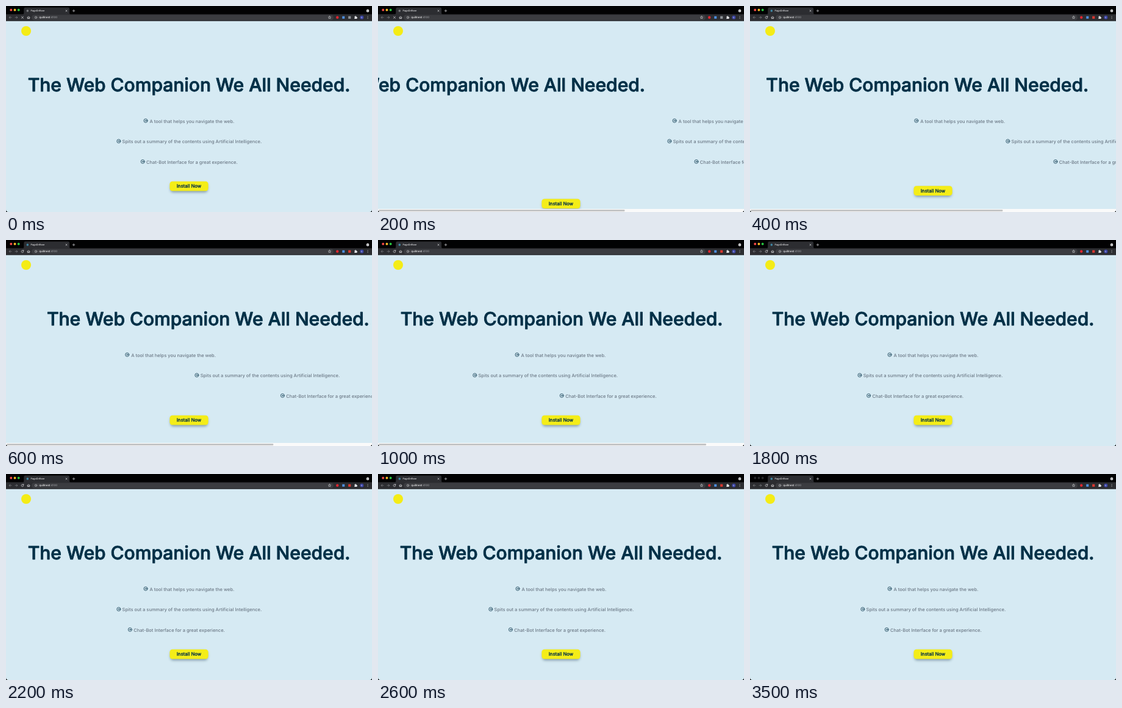
Write an HTML page that moves like this. It is 600 by 338 pixels and loops after 3.6 s.

```html
<!DOCTYPE html>
<html lang="en">
<head>
<meta charset="utf-8">
<title>PageDrifteer</title>
<style>
  html, body { margin: 0; width: 100%; height: 100%; overflow: hidden; background: #000; }
  svg { display: block; width: 600px; height: 338px; }
  text { font-family: Inter, "Open Sans", sans-serif; text-rendering: geometricPrecision; }
  .line { fill: none; stroke: #d4d5d7; stroke-width: .7; stroke-linecap: round; stroke-linejoin: round; }
  .dim { stroke: #85868a; }
  .heavy { font-weight: 500; fill: #023047; stroke: #023047; stroke-linejoin: round; text-anchor: middle; }
  .item text { font-size: 7.5px; font-weight: 500; fill: #6c7986; text-anchor: middle; }
  .item circle, .item path { fill: none; stroke: #023047; stroke-width: .75; stroke-linecap: round; stroke-linejoin: round; }
</style>
</head>
<body>
<svg viewBox="0 0 600 338" xmlns="http://www.w3.org/2000/svg">
  <defs>
    <clipPath id="win"><path d="M0 0H600V334a4 4 0 0 1-4 4H4a4 4 0 0 1-4-4Z"/></clipPath>
    <filter id="soft" x="-20%" y="-50%" width="140%" height="220%"><feGaussianBlur stdDeviation="1.9"/></filter>
  </defs>
  <rect width="600" height="338" fill="#000"/>
  <g clip-path="url(#win)">
    <rect y="24.5" width="600" height="313.5" fill="#d6eaf3"/>
    <circle cx="33" cy="41" r="8" fill="#f4ec16"/>

    <text id="title" class="heavy" x="300" y="140" font-size="30" stroke-width=".9">The Web Companion We All Needed.</text>
    <g id="items"></g>

    <g id="button">
      <rect x="269.5" y="290.5" width="61" height="15.2" rx="4.5" fill="#31505f" opacity=".5" filter="url(#soft)"/>
      <rect x="268.4" y="287.8" width="63.2" height="15.8" rx="4.5" fill="#f4ed18"/>
      <text class="heavy" x="300" y="298.3" font-size="7.7" stroke-width=".3">Install Now</text>
    </g>

    <g id="scroll">
      <rect y="333" width="600" height="5" fill="#fafafa"/>
      <rect id="thumb" x="1" y="334.3" height="2.7" rx="1.35" fill="#c0c1c2"/>
    </g>

    <!-- tab strip -->
    <rect width="600" height="14" fill="#020203"/>
    <g id="lights"><circle cx="8.3" cy="6.5" r="1.9"/><circle cx="14.5" cy="6.5" r="1.9"/><circle cx="20.7" cy="6.5" r="1.9"/></g>
    <path d="M27 14q2.3 0 2.3-2.3V5q0-2.4 2.4-2.4h70q2.4 0 2.4 2.4v6.7q0 2.3 2.3 2.3Z" fill="#2c2d31"/>
    <circle id="favicon" cx="35.3" cy="7.9" r="1.8"/>
    <text x="40.5" y="9.2" font-size="3.8" font-weight="500" fill="#e6e6e8">PageDrifteer</text>
    <path class="line" d="M97.9 6.7l2.3 2.3m0-2.3l-2.3 2.3M109.2 7.9h3.6M111 6.1v3.6"/>
    <circle cx="593" cy="7.9" r="2.3" fill="#e4e5e7"/>
    <path d="M591.9 7.5l1.1 1.1 1.1-1.1" fill="none" stroke="#111" stroke-width=".7"/>

    <!-- toolbar -->
    <rect y="13.5" width="600" height="11" fill="#2c2d31"/>
    <rect x="42" y="14.6" width="495" height="8.6" rx="4.3" fill="#3b3c40"/>
    <path class="line dim" d="M9 18.8H5.2m1.7-1.7l-1.7 1.7 1.7 1.7M15 18.8h3.8m-1.7-1.7l1.7 1.7-1.7 1.7"/>
    <path id="stop" class="line" d="M25.4 17.2l3.2 3.2m0-3.2l-3.2 3.2"/>
    <path id="reload" class="line" d="M28.8 19.3a1.9 1.9 0 1 1-.5-1.8l.5.5v-1.5m0 1.5h-1.5"/>
    <path class="line" d="M34.7 18.9l2.3-2 2.3 2m-3.9-.4v2.4h1v-1.5h1.2v1.5h1v-2.4"/>
    <circle class="line" cx="49" cy="18.8" r="1.8" style="stroke-width:.5"/>
    <path class="line" d="M49 18.7v.9M49 17.8v.01" style="stroke-width:.5"/>
    <text x="54.2" y="20.4" font-size="4.5" font-weight="500" fill="#f0f0f1">quillnest<tspan fill="#96989c">:4100</tspan></text>
    <path id="star" class="line" style="stroke-width:.6"/>
    <circle cx="543.2" cy="18.8" r="2.2" fill="#e0262f"/>
    <rect x="551.2" y="16.8" width="4" height="4" fill="#4d8fe0"/>
    <rect id="ext" x="561.1" y="16.7" width="4.2" height="4.2"/>
    <path d="M571 17.4h1.3a.8.8 0 1 1 1.5 0h1.2v1.3a.8.8 0 1 1 0 1.5V21h-4v-1.2a.7.7 0 1 0 0-1.3Z" fill="#e4e5e7"/>
    <circle cx="583.3" cy="18.8" r="3" fill="#3c45a5"/>
    <text x="583.3" y="20" text-anchor="middle" font-size="3.5" fill="#fff">k</text>
    <g fill="#d4d5d7"><circle cx="593" cy="17" r=".5"/><circle cx="593" cy="18.8" r=".5"/><circle cx="593" cy="20.6" r=".5"/></g>
  </g>
</svg>
<script>
const LOOP = 3600;
const $ = id => document.getElementById(id);
const shift = (el, x, y = 0) => el.setAttribute("transform", `translate(${x.toFixed(2)} ${y.toFixed(2)})`);
const show = (el, on) => el.setAttribute("visibility", on ? "visible" : "hidden");
const clamp = v => Math.min(1, Math.max(0, v));
const mix = (a, b, k) => a + (b - a) * k;

// cubic-bezier(.46, 0, .54, 1)
function ease(p) {
  p = clamp(p);
  let lo = 0, hi = 1;
  for (let i = 0; i < 24; i++) {
    const u = (lo + hi) / 2, v = 1 - u;
    if (1.38 * u * v * v + 1.62 * u * u * v + u * u * u < p) lo = u; else hi = u;
  }
  return lo * lo * (3 - 2 * lo);
}

// From one side to an overshoot at half time, then back to rest.
function swing(t, start, length, from, over) {
  const p = (t - start) / length * 2;
  return p < 1 ? mix(from, over, ease(p)) : mix(over, 0, ease(p - 1));
}

const items = [
  { text: "A tool that helps you navigate the web.", icon: 229, y: 188.2, start: 70, length: 1000 },
  { text: "Spits out a summary of the contents using Artificial Intelligence.", icon: 184.8, y: 221.8, start: 90, length: 2000 },
  { text: "Chat-Bot Interface for a great experience.", icon: 224.2, y: 255.3, start: 105, length: 3000 }
];
$("items").innerHTML = items.map(({ text, icon, y }) => `<g class="item">
  <circle cx="${icon}" cy="${y}" r="3.05"/>
  <path d="M${icon - 1.3} ${y}h2.6m-1-1l1 1-1 1"/>
  <text x="304.9" y="${y + 3.4}">${text}</text></g>`).join("");
items.forEach((item, i) => item.el = $("items").children[i]);

const corners = Array.from({ length: 10 }, (_, i) => {
  const a = i * Math.PI / 5, r = i % 2 ? 1.1 : 2.4;
  return `${(530.5 + r * Math.sin(a)).toFixed(2)} ${(18.9 - r * Math.cos(a)).toFixed(2)}`;
});
$("star").setAttribute("d", `M${corners.join("L")}Z`);

const lights = [...$("lights").children];
const lightColors = ["#fb4b48", "#fdb924", "#28c840"];

function draw(t) {
  const fresh = t >= 95;
  shift($("title"), fresh ? swing(t, 70, 1000, -150, 31.5) : 0);
  let extra = 0;
  for (const it of items) {
    const x = fresh ? swing(t, it.start, it.length, 300, -30.5) : 0;
    shift(it.el, x);
    extra = Math.max(extra, x);
  }
  shift($("button"), 0, fresh ? 33 * (1 - ease((t - 70) / 500)) : 0);

  show($("scroll"), extra > 8);
  $("thumb").setAttribute("width", 360000 / (592 + extra) - 1);

  const loading = t < 300;
  show($("stop"), loading);
  show($("reload"), !loading);
  $("favicon").setAttribute("fill", loading ? "#77797d" : "#3f86a3");
  $("ext").setAttribute("fill", loading ? "#8d9196" : "#d8372f");
  lights.forEach((el, i) => el.setAttribute("fill", t < 2800 ? lightColors[i] : "#28292b"));
}

function tick(now) {
  draw(now % LOOP);
  requestAnimationFrame(tick);
}
draw(0);
requestAnimationFrame(tick);
</script>
</body>
</html>
```
